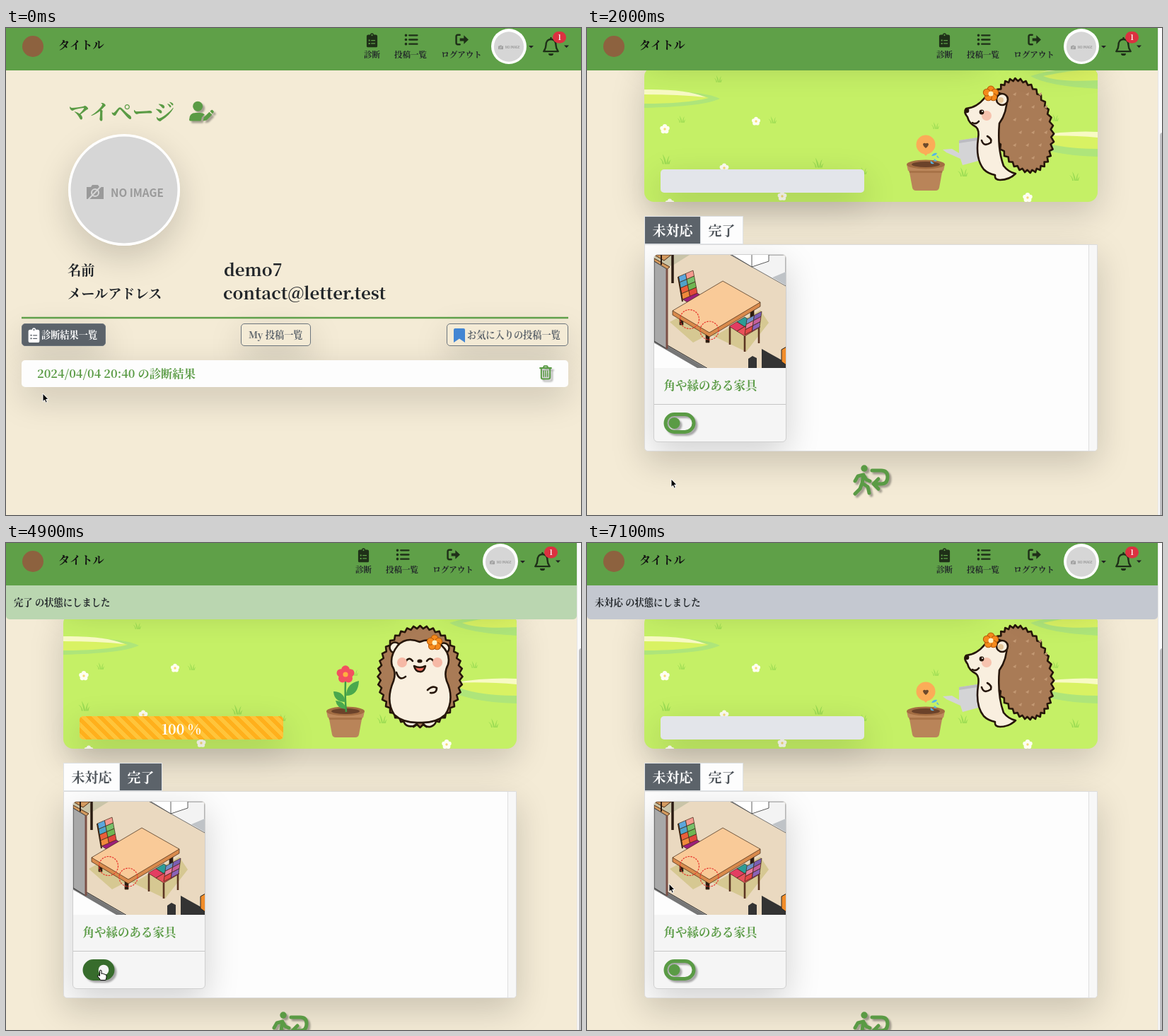
Write an HTML page that moves like this. It is 813x689 px and loops after 7200 ms.

```html
<!DOCTYPE html>
<html lang="ja">
<head>
<meta charset="utf-8">
<style>
  html, body { margin: 0; width: 100%; height: 100%; overflow: hidden; }
  body { background: #f4ebd6; font-family: "Noto Serif CJK JP", "Noto Serif JP", "Noto Serif", "Noto Sans CJK JP", serif; }
  #stage { position: relative; width: 813px; height: 689px; overflow: hidden; background: #f4ebd6; }
  #stage div, #stage svg { position: absolute; box-sizing: border-box; }
  .layer { left: 0; top: 0; width: 813px; height: 900px; overflow: visible; }
  .lg { box-shadow: 0 16px 48px rgba(0, 0, 0, .175); }
  .white { background: #fdfdfd; }
  .btn { top: 418px; height: 32px; border: 1px solid #6c757d; border-radius: 5px; }
  .tab { top: 456px; height: 40px; border: 1px solid #dee2e6; }
  text { fill: #212529; font-weight: 600; white-space: pre; }
  .green { fill: #5a9b45; color: #5a9b45; }
  .icon { color: #5a9b45; filter: drop-shadow(3px 3px 1px rgba(0, 0, 0, .32)); }
  .icon.hot { color: #376c2c; }
  .mid { text-anchor: middle; }
  .gray { fill: #5c636a; }
  .pale { fill: #fff; }
  .line { fill: none; stroke: currentColor; stroke-linecap: round; stroke-linejoin: round; }
  .ink { stroke: #26160a; stroke-width: 2.6; stroke-linejoin: round; stroke-linecap: round; }
  .none { fill: none; }
  .noimg { font-family: "Noto Sans CJK JP", "Noto Sans", sans-serif; font-weight: 700; fill: #9a9a9a; }
</style>
</head>
<body>
<div id="stage">
  <svg width="0" height="0">
    <defs>
      <symbol id="clip" viewBox="0 0 384 512"><path fill="currentColor" fill-rule="evenodd" d="M64 64h61a68 68 0 0 1 134 0h61q64 0 64 64v320q0 64-64 64H64q-64 0-64-64V128q0-64 64-64zM192 50a24 24 0 1 0 .1 0zM72 240h48v48H72zM160 248h144v32H160zM72 350h48v48H72zM160 358h144v32H160z"/></symbol>
      <symbol id="list" viewBox="0 0 20 18"><path class="line" stroke-width="2.4" d="M7 2.5H19M7 9H19M7 15.5H19"/><path class="line" stroke-width="3.8" d="M2 2.5h.1M2 9h.1M2 15.5h.1"/></symbol>
      <symbol id="exit" viewBox="0 0 20 18"><path class="line" stroke-width="2.6" d="M7 1.8H4Q1.6 1.8 1.6 4.2V13.8Q1.6 16.2 4 16.2H7"/><path fill="currentColor" d="M7 7h6V2.5L20 9l-7 6.5V11H7z"/></symbol>
      <symbol id="bell" viewBox="0 0 24 27"><path class="line" stroke-width="2.4" d="M12 1.5V3.5M12 3.5C7 3.5 5 7.5 5 11.5C5 16 3.5 18 1.8 20.6H22.2C20.5 18 19 16 19 11.5C19 7.5 17 3.5 12 3.5z"/><path fill="currentColor" d="M8.5 23.5h7a3.5 3.2 0 0 1-7 0z"/></symbol>
      <symbol id="trash" viewBox="0 0 24 28"><path class="line" stroke-width="2.7" d="M1.5 5.5H22.5M7.5 5L9.3 1.6H14.7L16.5 5M3.8 6V23Q3.8 26 6.8 26H17.2Q20.2 26 20.2 23V6"/><path class="line" stroke-width="2" d="M8.2 10.5V21.5M12 10.5V21.5M15.8 10.5V21.5"/></symbol>
      <symbol id="edit" viewBox="0 0 28 28"><path class="line" stroke-width="2.8" d="M12 5H5Q2 5 2 8V23Q2 26 5 26H19Q22 26 22 23V17M10.5 17.8L12 12.5L21.5 3Q23 1.6 24.6 3.2Q26.2 4.8 24.8 6.4L15.5 15.8zM18.5 5.8L22.2 9.4"/></symbol>
      <symbol id="userpen" viewBox="0 0 36 30"><circle cx="12.5" cy="7.5" r="7.2" fill="currentColor"/><path fill="currentColor" d="M0 27Q0 17 9.5 17H16Q20 17 22.5 19.5L18.5 23.5L17 29H2Q0 29 0 27zM20 29l1.3-5.2 8-8 4 4-8 8zM30.3 14.8l1.7-1.7q1.2-.9 2.3.2l1.1 1.1q1 1.2 0 2.2l-1.6 1.7z"/></symbol>
      <symbol id="walk" viewBox="0 0 52 44"><circle cx="16" cy="5" r="4.7" fill="currentColor"/><path class="line" stroke-width="5" d="M3 23L7 16L15 14L13 26L21 31L23 40M13 26L10 34L3 41M16 16L19 21L24 23"/><path class="line" stroke-width="5" d="M27 8H40Q49 8 49 17Q49 27 40 27H31M36 20L29 27L36 34"/></symbol>
      <symbol id="cam" viewBox="0 0 26 22"><path fill="#9a9a9a" d="M1 4H7L9 1H17L19 4H25V21H1z"/><circle cx="13" cy="12" r="5" fill="none" stroke="#d6d6d6" stroke-width="2"/><path stroke="#d6d6d6" stroke-width="2" d="M3 22L24 0"/></symbol>
      <g id="noimage"><circle r="79" fill="#fff"/><circle r="75.5" fill="#d6d6d6"/><use href="#cam" x="-54" y="-8" width="26" height="22"/><text class="noimg" x="-19" y="10" font-size="15.3">NO IMAGE</text></g>
      <g id="tuft"><path fill="#9cdc53" d="M-1 6Q-3-1-7-2Q-3 1-3 6zM0 6Q-2-4-3-7Q1-2 2 6zM2 6Q3-2 6-5Q4 0 4 6zM4 6Q5 2 8 0Q6 3 6 6z"/></g>
      <g id="petals"><circle cy="-4" r="3.3"/><circle cx="3.8" cy="-1.2" r="3.3"/><circle cx="2.4" cy="3.2" r="3.3"/><circle cx="-2.4" cy="3.2" r="3.3"/><circle cx="-3.8" cy="-1.2" r="3.3"/></g>
      <g id="pot"><path fill="#b98459" d="M455 389H503L498 416Q497 420 493 420H465Q461 420 460 416z"/><path fill="#a87348" d="M455 391H503L502 395H456z"/><path fill="#bd885c" d="M452 383H506L504 392H454z"/><ellipse cx="479" cy="383" rx="27" ry="6.5" fill="#a36d42"/><ellipse cx="479" cy="383" rx="20" ry="4" fill="#6b422a"/></g>
    </defs>
  </svg>

  <div id="mypage" class="layer">
    <div class="lg" style="left:88px;top:150px;width:158px;height:158px;border-radius:50%"></div>
    <div class="btn lg" style="left:22px;width:119px;background:#5c636a"></div>
    <div class="btn lg" style="left:332px;width:99px"></div>
    <div class="btn lg" style="left:623px;width:172px"></div>
    <div class="lg white" style="left:22px;top:470px;width:773px;height:38px;border-radius:5px"></div>
    <svg class="layer">
      <text class="green" x="88" y="130" font-size="30.4">マイページ</text>
      <g class="icon"><use href="#userpen" x="259" y="103" width="35" height="30"/></g>
      <use href="#noimage" x="167" y="229"/>
      <g font-size="19.2"><text x="87" y="350">名前</text><text x="87" y="383">メールアドレス</text></g>
      <g font-size="24"><text x="308" y="351">demo7</text><text x="307" y="384">contact@letter.test</text></g>
      <path stroke="#5fa04a" stroke-width="2.5" d="M22 410H795"/>
      <use href="#clip" x="31" y="424" width="17" height="21" color="#fff"/>
      <path fill="#4386d3" d="M633 427Q633 425 635 425H647Q649 425 649 427V445L641 439.5L633 445z"/>
      <g font-size="13.2"><text class="pale" x="50" y="439">診断結果一覧</text><text class="gray" x="343" y="439">My 投稿一覧</text><text class="gray" x="652" y="439">お気に入りの投稿一覧</text></g>
      <text id="link" class="green" x="44" y="495" font-size="16.3">2024/04/04 20:40 の診断結果</text>
      <g class="icon"><use href="#trash" x="754" y="477" width="18" height="21"/></g>
    </svg>
  </div>

  <div id="detail" class="layer">
    <div class="lg" style="left:81px;top:245px;width:641px;height:191px;border-radius:14px;background:#c5f066;overflow:hidden">
      <svg style="left:0;top:0" width="641" height="191" viewBox="81 245 641 191">
        <path fill="#aee57a" d="M81 281Q160 277 188 290Q165 301 81 303z"/><path fill="#d9f263" d="M81 279Q140 277 172 289Q140 297 81 297z"/><path fill="#f8fac4" d="M81 277Q140 276 168 288Q130 284 81 284z"/>
        <path fill="#aee57a" d="M627 258Q660 247 722 245V276Q650 272 627 258z"/><path fill="#d9f263" d="M645 258Q690 248 722 249V264Q665 267 645 258z"/><path fill="#f8fac4" d="M640 252Q680 245 722 246V250Q680 247 640 252z"/>
        <path fill="#aee57a" d="M620 350Q670 335 722 343V372Q650 370 620 350z"/><path fill="#d9f263" d="M630 345Q680 338 722 338V361Q660 361 630 345z"/><path fill="#f8fac4" d="M630 343Q680 335 722 337V345Q680 341 630 343z"/>
        <g id="meadow"></g>
        <g id="water">
          <use href="#pot"/>
          <path fill="#f9ab57" d="M474 365L479 371L484 365z"/><circle cx="479" cy="355" r="13.5" fill="#fbac58"/><path fill="#6e4a2c" d="M479 360Q475 357 475 354Q477 352 479 353.5Q481 352 483 354Q483 357 479 360z"/>
          <path fill="#d4d4d6" d="M526 349L552 345L557 377L531 384L528 375L508 366L503 362L516 361L526 367z"/><path fill="#bcbcc2" d="M526 349L552 345V349L526 353z"/>
          <path fill="#55b4e8" d="M487 371Q490 366 495 367Q494 371 487 371zM491 375Q489 380 495 378zM486 378Q484 383 491 382zM495 370Q493 373 498 374z"/>
          <g class="ink">
            <path id="backSide" fill="#a97b56"/>
            <path fill="#f9efdf" d="M594 287Q578 276 563 288Q551 303 536 304Q532 309 538 316Q540 325 550 330Q555 334 553 347Q549 375 561 390Q567 396 577 398Q576 405 584 405Q597 405 606 396Q596 394 589 385Q580 360 583 325Q594 310 594 287z"/>
            <circle cx="587" cy="291" r="8" fill="#f9efdf"/><circle cx="585" cy="292" r="4" fill="#e5c79b" stroke="none"/>
            <path class="none" d="M558 349Q561 359 571 352Q573 347 566 343M545 324Q550 327 554 322"/>
          </g>
          <circle cx="565" cy="314" r="7" fill="#f6c3ae"/><circle cx="558" cy="309" r="3.4" fill="#26160a"/><circle cx="559" cy="308" r="1" fill="#fff"/><circle cx="537" cy="307" r="3.3" fill="#26160a"/>
          <use href="#petals" transform="translate(571 283) scale(1.5)" fill="#f58a1c" stroke="#b65a0a" stroke-width=".7"/><circle cx="571" cy="283" r="3.5" fill="#fff1c2"/>
        </g>
        <g id="bloom">
          <use href="#pot" x="1"/>
          <path fill="none" stroke="#3f9b46" stroke-width="2.5" d="M480 340Q479 365 481 384"/>
          <path fill="#4aa84d" d="M480 370Q464 370 463 355Q478 355 480 370zM481 361Q498 361 499 340Q481 344 481 361zM480 380Q468 379 466 368Q480 369 480 380z"/>
          <use href="#petals" transform="translate(480 331) scale(1.75)" fill="#f3505f"/><circle cx="480" cy="331" r="3.6" fill="#ffb13f"/>
          <g class="ink">
            <path id="backFront" fill="#a97b56"/>
            <path fill="#f9efdf" d="M562 396Q564 406 576 404Q583 401 582 395zM588 395Q590 406 600 405Q609 402 608 394z"/>
            <circle cx="550" cy="293" r="7.5" fill="#f9efdf"/><circle cx="619" cy="294" r="7.5" fill="#f9efdf"/>
            <path fill="#f9efdf" d="M585 285Q566 277 554 290Q542 305 546 319Q552 328 548 340Q536 368 549 388Q562 400 585 399Q608 400 621 388Q635 366 623 340Q619 328 625 317Q629 302 616 290Q602 278 585 285z"/>
            <path class="none" d="M565 313Q570 305 575 312M595 312Q600 305 605 313M552 328Q556 341 565 334M596 353Q603 346 609 350Q609 358 600 357"/>
            <path fill="#ef6b5c" d="M577 319Q585 323 593 319Q591 328 585 327Q579 327 577 319z"/>
          </g>
          <circle cx="560" cy="314" r="7" fill="#f6b9a6"/><circle cx="610" cy="314" r="7" fill="#f6b9a6"/><ellipse cx="585" cy="312" rx="3.6" ry="2.6" fill="#26160a"/>
          <use href="#petals" transform="translate(606 286) scale(1.5)" fill="#f58a1c" stroke="#b65a0a" stroke-width=".7"/><circle cx="606" cy="286" r="3.5" fill="#fff1c2"/>
        </g>
      </svg>
    </div>
    <div id="bar" class="lg" style="left:104px;top:390px;width:288px;height:33px;border-radius:5px"></div>
    <div class="lg white" style="left:81px;top:172px;width:481px;height:53px;border-radius:14px"></div>
    <div class="lg white" style="left:616px;top:99px;width:106px;height:53px;border-radius:12px"></div>
    <div class="lg white" style="left:616px;top:172px;width:106px;height:53px;border-radius:12px"></div>
    <div id="panel" class="lg white" style="left:81px;top:496px;width:641px;border:1px solid #dcdcdc;border-radius:0 0 5px 5px;overflow:hidden">
      <div style="right:0;top:0;width:12px;height:100%;background:#f7f7f7;border-left:1px solid #dedede"></div>
      <div id="card" style="left:12px;top:13px;width:188px;height:266px">
        <div class="lg" style="left:0;top:0;width:188px;height:266px;border-radius:6px;background:#f5f5f5;border:1px solid #cfcfcf;overflow:hidden">
          <svg width="186" height="160" style="left:0;top:0">
            <rect width="186" height="160" fill="#ead9c0"/>
            <path fill="#f3f3f3" stroke="#555" stroke-width=".8" d="M108 0L186 44V0z"/>
            <path fill="#fff" stroke="#333" stroke-width=".8" d="M110 0L138 17L162 9V0M138 0V17"/>
            <path fill="#bfc3c7" d="M167 32L186 24V43z"/>
            <path fill="#fdfdfd" d="M0 118L74 160H0z"/><path stroke="#767676" stroke-width="6" d="M0 121L72 163"/><path stroke="#222" d="M0 117L76 161"/>
            <path fill="#c9c4a8" d="M0 0H50L26 15L0 18z"/>
            <path fill="#d39a5f" stroke="#4a2a14" d="M0 5L22 17L14 24L0 16zM0 0H24L14 8z"/>
            <path fill="#a8a8a8" stroke="#333" d="M0 9L18 20V133L0 122z"/><path stroke="#7b5046" stroke-width="3" d="M18 20V133"/>
            <path stroke="#2b1b12" stroke-width="3.5" d="M26 0V40"/><path stroke="#2b1b12" stroke-width="2" d="M10 0V14"/>
            <path fill="#d6c892" d="M22 95L38 86L90 112L150 78L162 96L130 137L78 112L55 124z"/>
            <g stroke="#3d2614" stroke-width=".7">
              <path fill="#9c1f7a" d="M39 62L56 51L67 58L50 69z"/>
              <g id="chairs"></g>
              <path fill="none" stroke-width="2" d="M34 31L40 66"/>
              <path fill="#2b1b12" d="M36 80h5v19h-5zM73 104h5v20h-5zM136 72h5v18h-5z"/>
              <path fill="#d98a4c" d="M26 79V85L78 116L150 73V67z"/><path fill="#f9ca98" d="M97 37L150 67L78 110L26 79z"/>
              <g id="seats"></g>
              <path fill="none" stroke="#5b3522" stroke-width="2.6" d="M107 102V127M128 115V137M148 103V125"/>
            </g>
            <g fill="none" stroke="#e7352c" stroke-width="1.2" stroke-dasharray="2.5 1.3"><circle cx="50" cy="91" r="13.5"/><circle cx="78" cy="107" r="13"/></g>
            <path fill="#333" d="M133 147L139 143L145 146V160H133zM152 133L186 152V160H152z"/><path fill="#f18d2a" stroke="#222" d="M180 134L187 130V156L180 151z"/>
          </svg>
          <div style="left:0;top:211px;width:186px;height:1px;background:#c6c6c6"></div>
        </div>
        <svg class="layer">
          <text class="green" x="14.5" y="192" font-size="16.5">角や縁のある家具</text>
          <g id="toggle" class="icon" transform="translate(14.5 224)">
            <g id="off"><rect class="line" x="2.5" y="2.5" width="40" height="25" rx="12.5" stroke-width="5"/><circle cx="15" cy="15" r="8" fill="currentColor"/></g>
            <g id="on"><rect width="45" height="30" rx="15" fill="currentColor"/><circle cx="29.5" cy="15" r="7.3" fill="#f5f5f5"/></g>
          </g>
        </svg>
      </div>
    </div>
    <div id="tabA" class="tab" style="left:81px;width:80px"></div>
    <div id="tabB" class="tab" style="left:160px;width:61px"></div>
    <svg class="layer">
      <text class="green" x="242" y="138" font-size="30.4">診断結果の管理</text>
      <text class="mid" x="321.5" y="207" font-size="22">2024/04/04 20:40 の診断結果</text>
      <g class="icon"><use href="#trash" x="657" y="112" width="24" height="28"/><use href="#edit" x="655" y="185" width="28" height="28"/></g>
      <g font-size="19"><text id="nameA" x="92.5" y="484">未対応</text><text id="nameB" x="171.5" y="484">完了</text></g>
      <text id="percent" class="mid pale" x="248" y="415.5" font-size="19.5">100 %</text>
      <g id="back" class="icon"><use href="#walk" x="376" width="52" height="44"/></g>
    </svg>
  </div>

  <div id="flash" style="left:0;top:59px;width:806.5px;height:48.5px;border-radius:0 0 5px 5px">
    <svg class="layer"><text id="note" x="11" y="30" font-size="13.3"></text></svg>
  </div>

  <div id="head" style="left:0;top:0;width:813px;height:59.5px;background:#5fa048">
    <svg class="layer">
      <circle cx="38" cy="26" r="15" fill="#8d623f"/>
      <text x="74" y="30" font-size="16.3" style="fill:#111">タイトル</text>
      <g id="nav" color="#1f3018">
        <use href="#clip" x="509.5" y="7" width="16" height="20.5"/><use href="#list" x="563" y="8" width="20" height="17"/><use href="#exit" x="634" y="8" width="21" height="17"/>
        <g class="mid" font-size="11.5"><text x="517.5" y="42">診断</text><text x="572" y="42">投稿一覧</text><text x="644" y="42">ログアウト</text></g>
        <circle cx="711" cy="26" r="25" fill="#fff"/><use href="#noimage" transform="translate(711 26.5) scale(.28)"/>
        <path fill="#222" d="M739 25H746L742.5 28.5zM789 24.5H796L792.5 28z"/>
        <use href="#bell" x="758.5" y="12.5" width="24" height="27"/>
        <rect x="773" y="5" width="19" height="16.5" rx="8.2" fill="#dc3140"/><text class="mid pale" x="782.5" y="17" font-size="10">1</text>
      </g>
    </svg>
  </div>
  <div id="scroll" style="left:806.5px;top:0;width:7px;height:689px;background:#fafafa;border-left:1px solid #e6e6e6">
    <div id="thumb" style="left:2.5px;width:8px;height:608px;border-radius:4px;background:#c0c0c2"></div>
  </div>
  <svg id="cursor" class="layer">
    <path id="arrow" fill="#000" stroke="#fff" stroke-width="1" d="M0 0V11.5L2.6 9.2L4.3 13.2L6.3 12.3L4.6 8.5H8z"/>
    <path id="hand" fill="#fff" stroke="#000" stroke-width="1" stroke-linejoin="round" d="M-1.5 1Q0-.5 1 1V5.5L2.5 5Q3.7 5 4 6Q5.5 5.5 6 6.6Q8 6.3 8 8V10.5Q7.5 13 6.8 14.5H-.5Q-1.5 12-4.5 9Q-4.8 7-2.8 7.7L-1.5 8.5z"/>
  </svg>
</div>

<script>
const $ = id => document.getElementById(id);
const LOOP = 7200, STEP = 100;

const uses = (name, list, extra = '') => list.map(([x, y, s]) =>
  `<use href="#${name}" transform="translate(${x} ${y}) scale(${s})" ${extra}/>`).join('');
const tufts = [[185, 262, .8], [133, 319, .8], [262, 320, .8], [110, 376, 1.1], [326, 381, 1.1], [492, 328, .8], [531, 394, 1], [689, 400, 1], [661, 317, .8], [390, 392, .8]];
const daisies = [[110, 333, .95], [239, 322, .85], [194, 388, .9], [276, 428, .9], [623, 430, .95], [117, 438, .9], [516, 243, .9], [104, 243, .8]];
$('meadow').innerHTML = uses('tuft', tufts) + uses('petals', daisies, 'fill="#fffef2"') +
  daisies.map(([x, y]) => `<circle cx="${x}" cy="${y}" r="1.7" fill="#f6dc79"/>`).join('');

// Closed zigzag around a sheared ellipse
function spines(cx, cy, rx, ry, n, shear) {
  let d = '';
  for (let i = 0; i < n * 2; i++) {
    const a = i * Math.PI / n, k = i % 2 ? 4 : 0;
    const x = (rx - k) * Math.cos(a), y = (ry - k) * Math.sin(a);
    d += `${i ? 'L' : 'M'}${(cx + x + shear * y).toFixed(1)} ${(cy + y).toFixed(1)}`;
  }
  return d + 'z';
}
$('backSide').setAttribute('d', spines(616, 328, 43, 67, 36, .16));
$('backFront').setAttribute('d', spines(585.5, 334, 60, 72, 40, 0));
let quills = '';
for (let r = 0; r < 6; r++)
  for (let c = 0; c < 3; c++) {
    const x = 602 + c * 18 + (r % 2) * 8, y = 284 + r * 18;
    if (((x - 616) / 36) ** 2 + ((y - 328) / 58) ** 2 < 1) quills += `M${x} ${y}l5-3-1 5z`;
  }
$('backSide').insertAdjacentHTML('afterend', `<path d="${quills}" fill="#c39873" stroke="none"/>`);

// Patchwork parallelogram: corner, edge across, edge down, columns, colours row by row
function quilt([x, y], [ux, uy], [vx, vy], cols, colors) {
  const rows = colors.length / cols;
  return colors.map((color, i) => {
    const c = (i % cols) / cols, r = Math.floor(i / cols) / rows;
    return `<path fill="${color}" d="M${x + ux * c + vx * r} ${y + uy * c + vy * r}l${ux / cols} ${uy / cols} ${vx / rows} ${vy / rows} ${-ux / cols} ${-uy / cols}z"/>`;
  }).join('');
}
$('chairs').innerHTML = quilt([34, 31], [21, -9], [6, 32], 2,
  ['#5ba6dc', '#f59a8f', '#4fa3c9', '#77c06a', '#ea5f3a', '#6fb652', '#f08a3c', '#e2483c']);
$('seats').innerHTML = quilt([106, 101], [22, -13], [22, 14], 2, ['#e33d62', '#2c9c96', '#e8505a', '#d94088']) +
  quilt([131, 91], [21, -11], [-3, 22], 2, ['#6d8fc9', '#7a5fb5', '#e77a9c', '#c65f9c', '#e34848', '#8a62b8']);

// time, x, y of the pointer tip
const track = [[0, 52, 517], [200, 52, 517], [700, 80, 487], [1300, 80, 487], [1900, 119, 638], [2300, 119, 638],
  [3000, 138, 565], [3600, 138, 565], [4000, 191, 344], [4200, 191, 344], [4800, 134, 604], [5600, 134, 604],
  [6100, 120, 332], [6500, 120, 332], [7000, 116, 482], [7200, 116, 482]];
const ease = p => p * p * (3 - 2 * p);
const clamp = p => Math.max(0, Math.min(1, p));
const within = (t, ...spans) => spans.some(([a, b]) => t >= a && t < b);
const show = (id, on) => { $(id).style.display = on ? '' : 'none'; };

function pointer(t) {
  const i = track.findIndex(k => k[0] > t);
  const [t0, x0, y0] = track[i - 1], [t1, x1, y1] = track[i];
  const p = ease((t - t0) / (t1 - t0));
  return [x0 + (x1 - x0) * p, y0 + (y1 - y0) * p];
}

function paintTab(box, label, active) {
  $(box).style.background = active ? '#5c636a' : '#fdfdfd';
  $(label).style.fill = active ? '#fff' : '#4d5359';
}

function render(t) {
  const detail = t >= 1000, flash = t >= 3600;
  const done = within(t, [3600, 5100]), doneTab = within(t, [4100, 6300]);
  const card = !within(t, [3600, 4100], [5100, 6300]);
  const scroll = 190 * ease(clamp((t - 1400) / 400));

  show('mypage', !detail);
  show('detail', detail);
  show('scroll', detail);
  show('flash', flash);
  show('card', card);
  show('bloom', done);
  show('water', !done);
  show('percent', done);
  show('on', done);
  show('off', !done);

  $('nav').setAttribute('transform', `translate(${detail ? -12 : 0} 0)`);
  $('detail').style.transform = `translateY(${flash ? -145 : -scroll}px)`;
  $('thumb').style.top = (flash ? (card ? 149 : 157) : scroll * .78) + 'px';
  const height = card ? 293 : 248;
  $('panel').style.height = height + 'px';
  $('back').setAttribute('transform', `translate(0 ${496 + height + 19})`);
  paintTab('tabA', 'nameA', !doneTab);
  paintTab('tabB', 'nameB', doneTab);
  $('bar').style.background = done
    ? 'linear-gradient(45deg,#ffc43a 25%,#ffb01c 25% 50%,#ffc43a 50% 75%,#ffb01c 75%) 0 0/16px 16px' : '#e3e5ea';
  $('flash').style.background = done ? '#bad6b0' : '#c4c8d0';
  $('note').textContent = (done ? '完了' : '未対応') + ' の状態にしました';

  $('link').style.fill = within(t, [500, 1000]) ? '#376c2c' : '';
  $('toggle').classList.toggle('hot', within(t, [2800, 3600], [4700, 5100]));
  const hand = within(t, [500, 1400], [2800, 3600], [3900, 4300], [4700, 5100], [6000, 6600]);
  show('hand', hand);
  show('arrow', !hand);
  const [x, y] = pointer(t);
  $('cursor').style.transform = `translate(${x}px,${y}px)`;
}

const start = performance.now();
function tick() {
  const t = (performance.now() - start) % LOOP;
  render(Math.floor(t / STEP) * STEP);
  requestAnimationFrame(tick);
}
tick();
</script>
</body>
</html>
```
